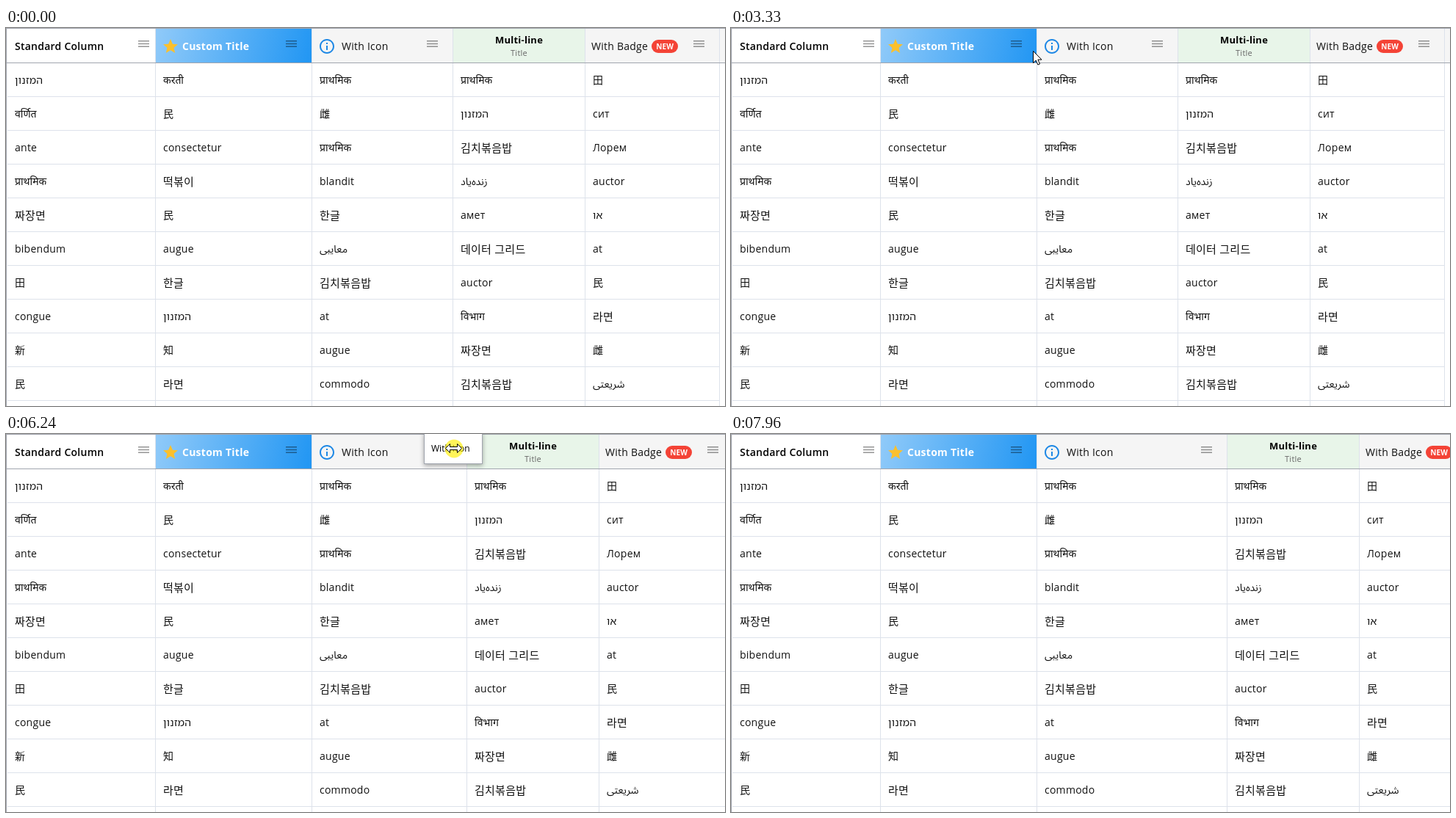
An HTML page for the animation above (8.56 s loop, 979 px wide and 515 px high).

```html
<!DOCTYPE html>
<html lang="en">
<head>
<meta charset="utf-8">
<title>Column titles</title>
<style>
html, body { margin: 0; width: 100%; height: 100%; overflow: hidden; background: #fff; }
#stage {
  position: relative; width: 979px; height: 515px; overflow: hidden; background: #fff;
  font: 14px/20px "Open Sans", "Noto Sans", "Noto Sans Devanagari", "Noto Sans Hebrew", "Noto Sans Arabic",
    "Noto Sans CJK KR", "Noto Sans CJK JP", "Noto Sans CJK SC", "Noto Sans CJK", sans-serif;
  letter-spacing: .25px; color: #111; white-space: nowrap; cursor: default;
}
#stage * { box-sizing: border-box; }
.bar { position: absolute; left: 0; top: 1px; width: 979px; height: 46px; background: #f5f5f5; }
.frame { position: absolute; inset: 0; border: solid #a1a5ae; border-width: 1px 0 0 1px; }
.rule { position: absolute; left: 0; top: 47px; width: 979px; height: 1px; background: #a1a5ae; }
.col { position: absolute; top: 1px; height: 514px; overflow: hidden; border-right: 1px solid #dde2eb; background: #fff; }
.head { position: relative; height: 47px; padding: 1px 0 1px 8px; display: flex; align-items: center; background: #f5f5f5; }
.head svg { flex: none; }
.burger { position: absolute; top: 16px; }
.cell { height: 46px; padding-left: 10px; display: flex; align-items: center; border-bottom: 1px solid #dde2eb; }
.hangul { font-size: 15px; }
.joined { letter-spacing: 0; }
.two { display: block; padding: 6px 0 0; text-align: center; background: #e8f5e9; }
.two b { display: block; font-size: 13px; line-height: 18px; color: #000; }
.two span { display: block; margin-top: 1px; font-size: 11px; line-height: 16px; color: #666; }
.badge {
  margin-left: 5px; height: 18px; padding: 0 6px; border-radius: 9px; background: #f44336;
  color: #fff; font-size: 10px; font-weight: 700; line-height: 18px;
}
#menu {
  position: absolute; left: 401px; top: 38px; width: 168px; height: 300px; padding: 8px 0; overflow: hidden;
  border-radius: 3px; background: #fff; font-size: 13px; box-shadow: 0 1px 4px rgba(0,0,0,.38);
}
#menu p { margin: 0; height: 36px; padding-left: 12px; line-height: 36px; }
#menu p.off { color: #9a9a9a; }
#menu hr { margin: 0; border: 0; height: 16px; background: linear-gradient(#777, #777) 0 7px / 100% 2px no-repeat; }
#chip {
  position: absolute; left: 0; top: 0; width: 80px; height: 43px; padding-left: 9px;
  border: 1px solid #a1a5ae; background: #fff; box-shadow: 0 2px 6px rgba(0,0,0,.35);
  font-size: 12px; font-weight: 500; line-height: 42px; letter-spacing: 0; color: #000;
}
#press { position: absolute; left: -12.5px; top: -12.5px; width: 25px; height: 25px; border-radius: 50%; background: rgba(255,238,0,.65); }
.pointer { position: absolute; left: 0; top: 0; overflow: visible; fill: #fff; stroke: #000; stroke-width: 1; }
</style>
</head>
<body>
<div id="stage">
  <div class="bar"></div>
  <div id="grid"></div>
  <div class="rule"></div>
  <div class="frame"></div>
  <div id="menu">
    <p>Freeze to start</p><p>Freeze to end</p><hr>
    <p>Auto fit</p><p>Hide column</p><p>Set columns</p><hr>
    <p>Set filter</p><p class="off">Reset filter</p>
  </div>
  <div id="chip">With Icon</div>
  <div id="press"></div>
  <svg id="arrow" class="pointer" width="13" height="20"><path d="M.5 .5V16.6L4.3 13.1 6.9 19.1 9.5 18 6.9 12.1H12Z"/></svg>
  <svg id="resize" class="pointer" width="1" height="1"><path d="M-11 0L-5-6V-2H5V-6L11 0 5 6V2H-5V6Z"/></svg>
</div>
<script>
const LOOP = 8560;
const $ = id => document.getElementById(id);
const clamp = v => Math.max(0, Math.min(1, v));

const icon = (path, color) =>
  `<svg width="24" height="24" viewBox="0 0 24 24" fill="${color}"><path d="${path}"/></svg>`;
const star = icon("M12 17.27L18.18 21l-1.64-7.03L22 9.24l-7.19-.61L12 2 9.19 8.63 2 9.24l5.46 4.73L5.82 21z", "#fbc02d");
const info = icon("M11 7h2v2h-2zm0 4h2v6h-2zm1-9C6.48 2 2 6.48 2 12s4.48 10 10 10 10-4.48 10-10S17.52 2 12 2zm0 18c-4.41 0-8-3.59-8-8s3.59-8 8-8 8 3.59 8 8-3.59 8-8 8z", "#1e88e5");
const burger = right => `<svg class="burger" style="right:${right}px" width="15" height="9" fill="rgba(0,0,0,.42)">
  <path d="M0 0H15V1.5H0ZM0 3.75H15V5.25H0ZM0 7.5H15V9H0Z"/></svg>`;

const columns = [
  { width: 202, style: "background:#fff;padding-left:10px;font-weight:600;color:#000",
    head: "Standard Column" + burger(8),
    cells: "המזנון|वर्णित|ante|प्राथमिक|짜장면|bibendum|田|congue|新|民" },
  { width: 213, style: "background:linear-gradient(102deg,#90caf9,#2196f3);font-weight:700;color:#fff",
    head: star + '<span style="margin-left:4px">Custom Title</span>' + burger(20),
    cells: "करती|民|consectetur|떡볶이|民|augue|한글|המזנון|知|라면" },
  { width: 192, head: info + '<span style="margin-left:8px">With Icon</span>' + burger(20),
    cells: "प्राथमिक|雌|प्राथमिक|blandit|한글|معایبی|김치볶음밥|at|augue|commodo" },
  { width: 180, kind: "two", head: "<b>Multi-line</b><span>Title</span>",
    cells: "प्राथमिक|המזנון|김치볶음밥|زنده&zwnj;یاد|амет|데이터 그리드|auctor|विभाग|짜장면|김치볶음밥" },
  { width: 183, head: 'With Badge<span class="badge">NEW</span>' + burger(20),
    cells: "田|сит|Лорем|auctor|או|at|民|라면|雌|شریعتی" },
];

const script = text =>
  /[\uac00-\ud7a3]/.test(text) ? "hangul" : /[\u0600-\u06ff\u0900-\u097f]/.test(text) ? "joined" : "";
const cell = text => `<div class="cell"><span class="${script(text)}">${text}</span></div>`;

for (const c of columns) {
  c.el = document.createElement("div");
  c.el.className = "col";
  c.el.innerHTML = `<div class="head ${c.kind || ""}" style="${c.style || ""}">${c.head}</div>` +
    c.cells.split("|").map(cell).join("") + cell("");
  $("grid").append(c.el);
}

function layout(grow) {
  let x = 2;
  columns.forEach((c, i) => {
    const w = c.width + (i === 2 ? grow : 0);
    c.el.style.left = x + "px";
    c.el.style.width = w + "px";
    x += w;
  });
}

// Spans of activity: start, end, number of steps. The picture rests in between.
const spans = [
  [640, 1460, 11], [1530, 1600, 2], [1860, 2600, 9], [2730, 2860, 2], [3000, 3810, 11], [3880, 4220, 5],
  [4480, 4760, 5], [5020, 5230, 4], [5630, 5770, 3], [6100, 6930, 13], [7200, 7960, 11],
];
function stepTime(t) {
  let q = 0;
  for (const [a, b, n] of spans) {
    if (t < a) break;
    const d = (b - a) / (n - 1);
    q = Math.min(b, a + Math.floor((t - a + 8) / d) * d);
  }
  return q;
}

// Pointer path: time, x, y, shape (0 none, 1 arrow, 2 resize).
const path = [
  [0, 0, 0, 0], [640, 593, 421, 1], [1050, 470, 150, 1], [1296, 392, 20, 1], [1378, 362, 0, 1],
  [1460, 372, 26, 1], [1600, 474, 0, 1], [1860, 434, 14, 1], [2138, 380, 26, 1],
  [2600, 413, 15, 1], [2860, 413, 15, 1], [3162, 354, 10, 1], [3324, 411, 31, 1],
  [3567, 401, 38, 1], [3645, 404, 36.5, 2], [4760, 411, 26, 1], [5020, 440, 24, 1],
  [5230, 600, 19, 1], [5630, 590.5, 27, 2], [5770, 590.5, 27, 2], [6100, 593, 25, 2], [6169, 601, 21, 2],
  [6238, 609.5, 19.5, 2], [6515, 652.5, 19.5, 2], [6654, 656.5, 20, 2], [6861, 657.5, 21, 2],
  [6930, 657.5, 27, 2], [7200, 664, 24, 1], [7884, 803, 227, 1], [7960, 0, 0, 0],
];
function pointerAt(t) {
  let i = 0;
  while (i + 1 < path.length && path[i + 1][0] <= t + 1) i++;
  const [t0, x, y, shape] = path[i], next = path[i + 1];
  if (!next || next[3] !== shape) return { x, y, shape };
  const k = clamp((t - t0) / (next[0] - t0));
  return { x: x + (next[1] - x) * k, y: y + (next[2] - y) * k, shape };
}

function place(el, visible, x, y) {
  el.style.display = visible ? "" : "none";
  el.style.transform = `translate(${x}px,${y}px)`;
}

const items = [...$("menu").children];
const unit = 1 / (items.length + 1.5);
function drawMenu(t) {
  const p = clamp(t < 4550 ? (t - 3739) / 300 : 1 - (t - 4550) / 200);
  const menu = $("menu").style;
  menu.display = p > 0 ? "" : "none";
  menu.opacity = clamp(p * 3);
  menu.width = 168 * clamp(p / unit) + "px";
  menu.height = 300 * clamp(p / (unit * items.length)) + "px";
  items.forEach((el, i) => { el.style.opacity = clamp((p - (i + 1) * unit) / (1.5 * unit)); });
}

const within = (t, a, b) => t > a - 1 && t < b - 1;

function draw(now) {
  const t = stepTime(now % LOOP);
  const { x, y, shape } = pointerAt(t);
  const dragging = within(t, 6100, 6930);
  const pressed = within(t, 3720, 4220) || within(t, 4550, 4690) || within(t, 5770, 6930);
  layout(dragging ? Math.round(x - 590.5) : t < 6100 ? 0 : 67);
  drawMenu(t);
  place($("chip"), dragging, Math.round(x - 41), Math.round(y - 21.5));
  place($("press"), pressed, x, y);
  place($("arrow"), shape === 1, Math.round(x), Math.round(y));
  place($("resize"), shape === 2, Math.floor(x) + .5, Math.floor(y) + .5);
}

let start;
function tick(now) {
  start ??= now;
  draw(now - start);
  requestAnimationFrame(tick);
}
draw(0);
requestAnimationFrame(tick);
</script>
</body>
</html>
```
